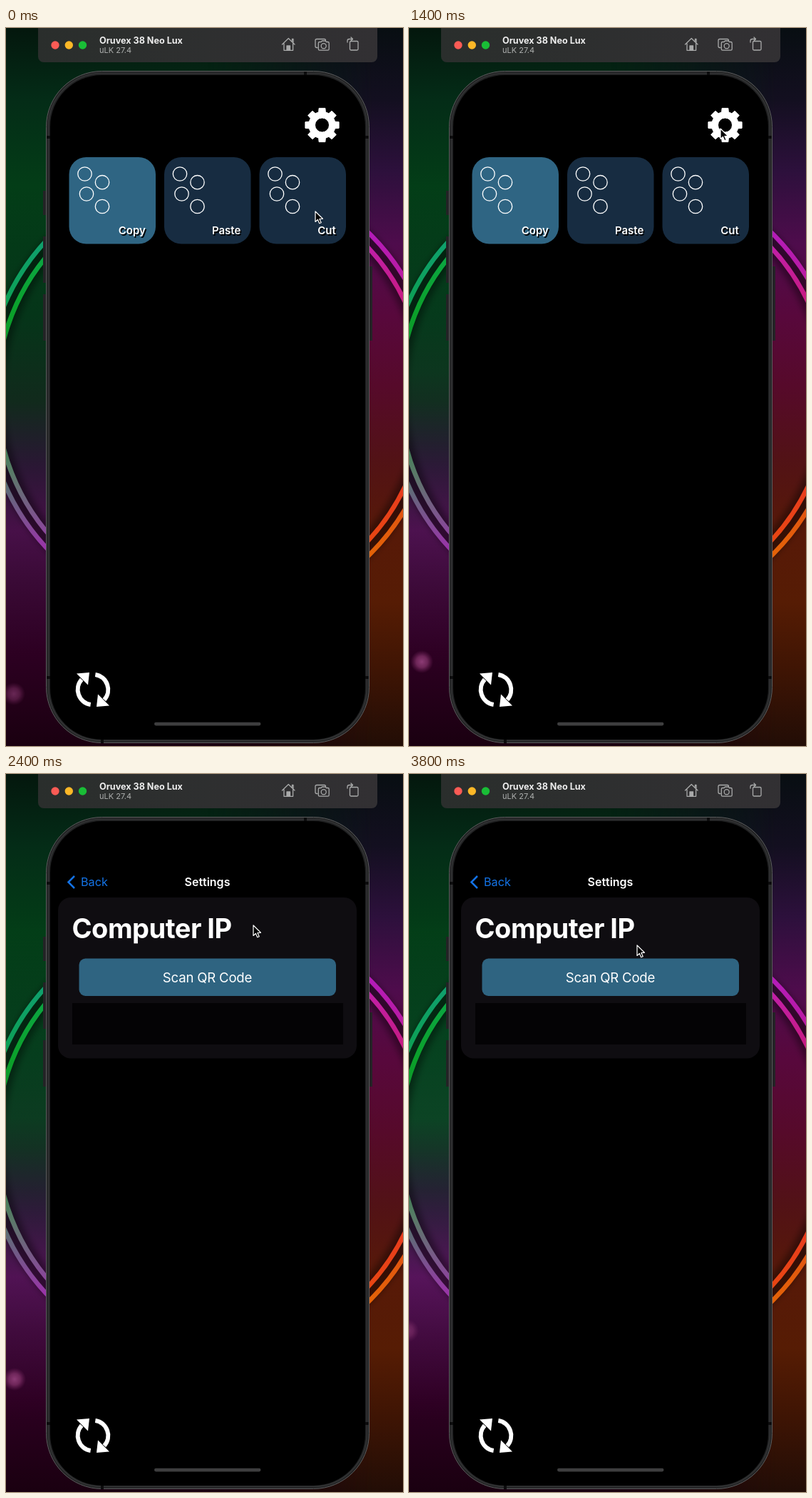
Recreate the animation shown at these times as an HTML page. Size 557 by 1006 pixels, loop 3900 ms.

```html
<!DOCTYPE html>
<html lang="en">
<head>
<meta charset="utf-8">
<title>Settings demo</title>
<style>
  html, body { margin: 0; width: 100%; height: 100%; overflow: hidden; background: #000; }
  svg { display: block; width: 557px; height: 1006px; font-family: Inter, sans-serif; }
  .tile text { font-weight: 600; font-size: 15px; text-anchor: end; fill: #fff; }
  .mid { text-anchor: middle; }
</style>
</head>
<body>
<svg viewBox="0 0 557 1006">
  <defs id="defs">
    <linearGradient id="leftBg" x2="0" y2="1">
      <stop offset="0" stop-color="#04170d"/><stop offset=".1" stop-color="#042c17"/>
      <stop offset=".22" stop-color="#033d17"/><stop offset=".4" stop-color="#053519"/>
      <stop offset=".52" stop-color="#112a1c"/><stop offset=".61" stop-color="#2a1734"/>
      <stop offset=".7" stop-color="#471048"/><stop offset=".77" stop-color="#3a0a36"/>
      <stop offset=".87" stop-color="#2d0022"/><stop offset="1" stop-color="#1a0010"/>
    </linearGradient>
    <linearGradient id="rightBg" x2="0" y2="1">
      <stop offset="0" stop-color="#080e12"/><stop offset=".1" stop-color="#130f20"/>
      <stop offset=".2" stop-color="#2d103c"/><stop offset=".3" stop-color="#4e0c4c"/>
      <stop offset=".4" stop-color="#58083c"/><stop offset=".5" stop-color="#560a2a"/>
      <stop offset=".6" stop-color="#521216"/><stop offset=".7" stop-color="#571908"/>
      <stop offset=".8" stop-color="#561c04"/><stop offset=".9" stop-color="#3d1404"/>
      <stop offset="1" stop-color="#220d06"/>
    </linearGradient>
    <linearGradient id="fade">
      <stop offset="0" stop-color="#fff" stop-opacity="0"/><stop offset=".85" stop-color="#fff"/>
    </linearGradient>
    <mask id="blend"><rect x="283" width="274" height="1006" fill="url(#fade)"/></mask>
    <linearGradient id="lift" x2="0" y2="1">
      <stop offset=".2" stop-color="#0a6030" stop-opacity="0"/>
      <stop offset=".48" stop-color="#0a6030" stop-opacity=".45"/>
      <stop offset=".58" stop-color="#30304a" stop-opacity=".25"/>
      <stop offset=".7" stop-color="#66186e" stop-opacity=".5"/>
      <stop offset=".9" stop-color="#500848" stop-opacity="0"/>
    </linearGradient>
    <linearGradient id="bar"><stop offset="0" stop-color="#2a2e2c"/><stop offset="1" stop-color="#323033"/></linearGradient>
    <radialGradient id="glow">
      <stop offset="0" stop-color="#a04886"/><stop offset=".5" stop-color="#943c78" stop-opacity=".75"/>
      <stop offset="1" stop-color="#802a66" stop-opacity="0"/>
    </radialGradient>
    <filter id="soft" x="-10%" y="-10%" width="120%" height="120%"><feGaussianBlur stdDeviation="5"/></filter>
    <clipPath id="leftHalf"><rect width="283" height="1006"/></clipPath>
    <clipPath id="rightHalf"><rect x="283" width="274" height="1006"/></clipPath>
    <clipPath id="view"><rect x="73" y="104" width="419" height="790"/></clipPath>
  </defs>

  <!-- wallpaper -->
  <rect width="557" height="1006" fill="url(#leftBg)"/>
  <rect id="tint" width="283" height="1006" fill="url(#lift)"/>
  <rect x="283" width="274" height="1006" fill="url(#rightBg)" mask="url(#blend)"/>
  <circle cx="288" cy="513" r="305" fill="none" stroke="#000" stroke-opacity=".4" stroke-width="28" filter="url(#soft)"/>
  <g id="rings" fill="none" stroke-width="6.500"></g>
  <circle id="spark" r="16" fill="url(#glow)"/>

  <!-- window bar -->
  <path d="M45 0H521V40a8 8 0 0 1-8 8H53a8 8 0 0 1-8-8Z" fill="url(#bar)"/>
  <circle cx="69" cy="24" r="5.7" fill="#fb5b55"/>
  <circle cx="88.3" cy="24" r="5.7" fill="#fcb827"/>
  <circle cx="107.5" cy="24" r="5.7" fill="#19bd36"/>
  <text x="131" y="22" font-size="12.6" font-weight="700" fill="#eee">Oruvex 38 Neo Lux</text>
  <text x="131" y="35" font-size="11" fill="#aeb0af">uLK 27.4</text>
  <g fill="none" stroke="#a9aaaa" stroke-width="1.3" stroke-linejoin="round" stroke-linecap="round">
    <path d="M387.5 23 396.300 14.500 405 23M390 21.500V31.300H402.600V21.500M401.500 18.500V15.500H403V20"/>
    <path d="M394 31V25h4.500v6Z" fill="#a9aaaa"/>
    <path d="M437 27.500H436a2 2 0 0 1-2-2V17.500a2 2 0 0 1 2-2H446.500a2 2 0 0 1 2 2"/>
    <path d="M440 19.500h2l1.500-1.500h4.500l1.500 1.500h2a1.700 1.700 0 0 1 1.700 1.700v8.300a1.700 1.700 0 0 1-1.700 1.700H440a1.700 1.700 0 0 1-1.700-1.700V21.200a1.700 1.700 0 0 1 1.700-1.700Z"/>
    <circle cx="445.700" cy="25.200" r="3.500"/>
    <rect x="482.500" y="18.500" width="11.500" height="12.500" rx="1.500"/>
    <path d="M479 20V18a2.500 2.500 0 0 1 2.500-2.500H486M484 13l2.500 2.500L484 18"/>
  </g>

  <!-- phone -->
  <path d="M54 228V262M54 292V357M54 373V438M512 334V438" stroke="#242326" stroke-width="4"/>
  <rect x="56.500" y="60.500" width="453" height="941" rx="78" fill="#202122" stroke="#5c5d5e"/>
  <rect x="59.500" y="63.500" width="447" height="935" rx="75" fill="none" stroke="#303132" stroke-width="2"/>
  <path d="M57 153H62M504 153H509M57 910H62M504 910H509M420 61V66M135 997V1002" stroke="#0c0c0d" stroke-width="4"/>
  <rect x="62" y="66" width="442" height="931" rx="72.500"/>

  <g clip-path="url(#view)">
    <g id="home">
      <path id="gear" fill="#fff" stroke="#fff" stroke-linejoin="round" fill-rule="evenodd" transform="translate(443.500 136)"/>
    </g>
    <g id="page">
      <rect x="73" y="104" width="419" height="790"/>
      <path d="M96 143 87.500 151.500 96 160" fill="none" stroke="#1473e6" stroke-width="2.500"/>
      <text x="105" y="157" font-size="16.200" fill="#1473e6">Back</text>
      <text class="mid" x="282.500" y="157" font-size="16" font-weight="600" fill="#fff">Settings</text>
      <rect x="73" y="173" width="419" height="225.500" rx="18" fill="#0f0d11"/>
      <text x="92.500" y="229.500" font-size="38" font-weight="700" letter-spacing="-.5" fill="#fff">Computer IP</text>
      <rect x="102.500" y="258.500" width="360.500" height="52.500" rx="9" fill="#2f6481"/>
      <text class="mid" x="282.500" y="292" font-size="18.600" letter-spacing="-.2" fill="#fff">Scan QR Code</text>
      <rect x="93" y="321" width="380" height="58" fill="#040305"/>
    </g>
  </g>

  <g id="refresh" transform="translate(122 927)"></g>
  <rect x="208" y="972.700" width="149.500" height="4.800" rx="2.400" fill="#3e3e3f"/>

  <path id="cursor" d="M0 0V14.500L3.400 11.500 5.700 16.800 8.200 15.700 5.900 10.500 10.400 10.300Z"
    stroke="#fff" stroke-width="1.200" stroke-linejoin="round"/>
</svg>
<script>
const $ = id => document.getElementById(id);
const add = (id, markup) => $(id).insertAdjacentHTML('beforeend', markup);

// Wallpaper rings: side, radius, colours from top to bottom
[
  ['left', 316, '#10a070 #0ca050 #0b8a40 #4f7a6a #9e30ac'],
  ['left', 301, '#0ca84a #0ba02a #0e8a2e #5a7a68 #9a34ac'],
  ['right', 316, '#b41cb8 #c01a90 #b02050 #e04a18 #e36208'],
  ['right', 301, '#c020b0 #c81a78 #c02040 #e83a20 #e84810'],
].forEach(([side, r, colours], i) => {
  const stops = colours.split(' ').map((c, k) => `<stop offset="${k / 4}" stop-color="${c}"/>`).join('');
  add('defs', `<linearGradient id="ring${i}" gradientUnits="userSpaceOnUse"
    x1="0" y1="290" x2="0" y2="735">${stops}</linearGradient>`);
  add('rings', `<circle cx="288" cy="513" r="${r}" stroke="url(#ring${i})" clip-path="url(#${side}Half)"/>`);
});

// Action tiles
['Copy', 'Paste', 'Cut'].forEach((name, i) => {
  const dots = [[22, 23.5], [46.5, 35.2], [24.5, 51.5], [46.5, 69]]
    .map(([x, y]) => `<circle cx="${x}" cy="${y}" r="9.700"/>`).join('');
  add('home', `<g class="tile" transform="translate(${88.5 + i * 133.5} 181)">
    <rect width="121.500" height="121.500" rx="24" fill="${i ? '#172c41' : '#2f6583'}"/>
    <g fill="none" stroke="#fff" stroke-width="1.300">${dots}</g>
    <text x="109" y="109.500" style="fill:#000">${name}</text>
    <text x="107.300" y="108">${name}</text></g>`);
});

// Eight-toothed gear
const polar = (r, deg) => {
  const a = deg * Math.PI / 180;
  return `${(r * Math.cos(a)).toFixed(2)} ${(r * Math.sin(a)).toFixed(2)}`;
};
const teeth = Array.from({ length: 8 }, (_, k) =>
  [[18.8, -15], [24, -10.5], [24, 10.5], [18.8, 15]].map(([r, d]) => polar(r, k * 45 + d)).join('L'));
$('gear').setAttribute('d', `M${teeth.join('L')}ZM10 0A10 10 0 1 0-10 0A10 10 0 1 0 10 0Z`);

// Two half-turn arrows
for (const turn of [0, 180])
  add('refresh', `<g transform="rotate(${turn})">
    <path d="M${polar(21.3, 99)}A21.300 21.300 0 0 1 ${polar(21.3, 222)}" fill="none" stroke="#fff" stroke-width="6"/>
    <path d="M-23-22.500-5-24-7-6.500Z" fill="#fff"/></g>`);

const LOOP = 3900, PUSH = 1550;
// Rows are [time, x, y]
const pointer = [[0, 434, 257], [800, 277, 573], [1400, 437, 141], [2000, 437, 141],
  [2400, 347, 212], [2800, 319, 241], [3200, 319, 241], [3800, 320, 240]];
const drift = [[0, 11, 933], [800, 21, 908], [1400, 18, 888], [2000, 14, 865],
  [2400, 12, 848], [3200, 6, 810], [3800, -2, 780]];
const smooth = u => u * u * (3 - 2 * u);

function at(rows, t, ease = u => u) {
  const i = Math.max(1, rows.findIndex(row => row[0] >= t));
  const [t0, x0, y0] = rows[i - 1], [t1, x1, y1] = rows[i];
  const u = ease((t - t0) / (t1 - t0));
  return [x0 + (x1 - x0) * u, y0 + (y1 - y0) * u];
}
const move = (id, x, y) => $(id).setAttribute('transform', `translate(${x.toFixed(2)} ${y.toFixed(2)})`);

// Critically damped navigation push
function pushed(t) {
  const s = Math.max(0, t - PUSH) * .016;
  return 1 - (1 + s) * Math.exp(-s);
}

function draw(t) {
  const p = pushed(t);
  move('cursor', ...at(pointer, t, smooth));
  move('spark', ...at(drift, t));
  $('spark').setAttribute('opacity', .55 + .3 * Math.sin(Math.PI * Math.min(1, t / 3600)));
  $('tint').setAttribute('opacity', t / LOOP);
  move('home', -126 * p, 0);
  $('home').setAttribute('opacity', 1 - .2 * p);
  move('page', 419 * (1 - p), 0);
}

const start = performance.now();
function tick() {
  const t = (performance.now() - start) % LOOP;
  draw(Math.floor(t / 100) * 100);
  requestAnimationFrame(tick);
}
tick();
</script>
</body>
</html>
```
